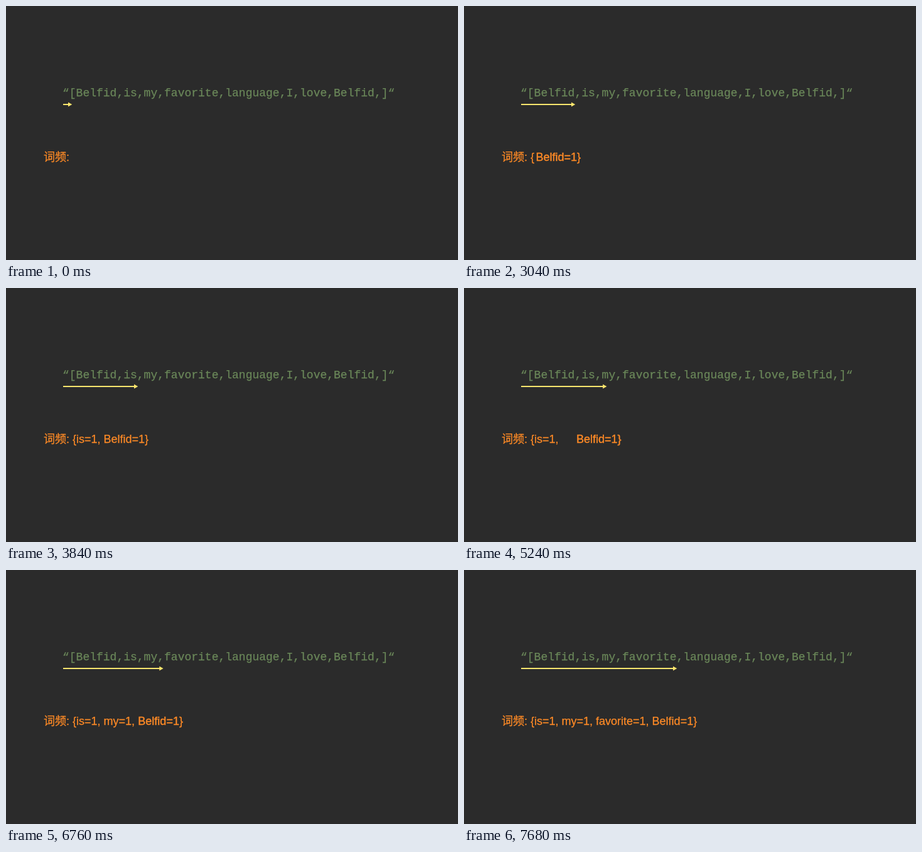
Animation of 720x405 px, one loop 8 s. Source, as an HTML page with a canvas:

```html
<!DOCTYPE html>
<html lang="zh-CN">
<head>
<meta charset="utf-8">
<title>词频</title>
<style>
  html, body { margin: 0; height: 100%; overflow: hidden; background: #2b2b2b; }
  canvas { display: block; }
</style>
</head>
<body>
<canvas id="stage" width="720" height="405"></canvas>
<script>
const ctx = document.getElementById('stage').getContext('2d');
const MONO = '18px "Liberation Mono", monospace';
const SANS = '18px "Liberation Sans", "Noto Sans CJK SC", "Noto Sans CJK", sans-serif';
const LOOP = 8000, TICK = 40, HALF = 960;   // each step: rest, then move

const tips = [105, 175, 210, 250, 339];     // arrow tip after each step
const entries = ['is=1, ', 'my=1, ', 'favorite=1, '];
const label = '词频: ', tail = 'Belfid=1}';

// cubic-bezier(.42, 0, .58, 1), solved by bisection
function ease(x) {
  if (x <= 0) return 0;
  let lo = 0, hi = 1, s = 0.5;
  for (let i = 0; i < 24; i++) {
    s = (lo + hi) / 2;
    const bx = 1.26 * s * (1 - s) ** 2 + 1.74 * s * s * (1 - s) + s ** 3;
    if (bx < x) lo = s; else hi = s;
  }
  return s * s * (3 - 2 * s);
}

// Slightly thickened text; returns the x where it ends
function text(str, x, y, alpha = 1, weight = 0.25) {
  ctx.globalAlpha = alpha;
  ctx.lineWidth = weight;
  ctx.fillText(str, x, y);
  ctx.strokeText(str, x, y);
  ctx.globalAlpha = 1;
  return x + ctx.measureText(str).width;
}

function arrow(tip) {
  ctx.fillStyle = '#ffe66d';
  ctx.fillRect(91, 156, tip - 96, 2);
  ctx.beginPath();
  ctx.moveTo(tip + 0.3, 157);
  ctx.lineTo(tip - 6, 153.5);
  ctx.lineTo(tip - 6, 160.5);
  ctx.fill();
}

function draw(t) {
  const step = Math.floor(t / (2 * HALF));
  const u = (t % (2 * HALF) - HALF) / HALF;
  const p = ease(u);
  const fade = Math.min(1, Math.max(0, (u - 0.6) / 0.4));

  ctx.fillStyle = '#2b2b2b';
  ctx.fillRect(0, 0, 720, 405);

  ctx.font = MONO;
  ctx.fillStyle = ctx.strokeStyle = '#6a8759';
  text('“[Belfid,is,my,favorite,language,I,love,Belfid,]“', 90, 144);

  const next = tips[Math.min(step + 1, tips.length - 1)];
  arrow(tips[step] + (next - tips[step]) * p);

  ctx.font = SANS;
  ctx.fillStyle = ctx.strokeStyle = '#ff8a26';
  let x = text(label, 60, 247);
  if (step === 0) {
    text('{' + tail, x, 247, fade);
    return;
  }
  x = text('{' + entries.slice(0, step - 1).join(''), x, 247);
  const added = entries[step - 1];
  if (added) {
    const end = text(added, x, 247, fade);
    x += (end - x) * p;
  }
  text(tail, x, 247, 1, p > 0 ? 0.4 : 0.25);
}

function frame(now) {
  draw(Math.floor(now % LOOP / TICK) * TICK);
  requestAnimationFrame(frame);
}
draw(0);
requestAnimationFrame(frame);
</script>
</body>
</html>
```
